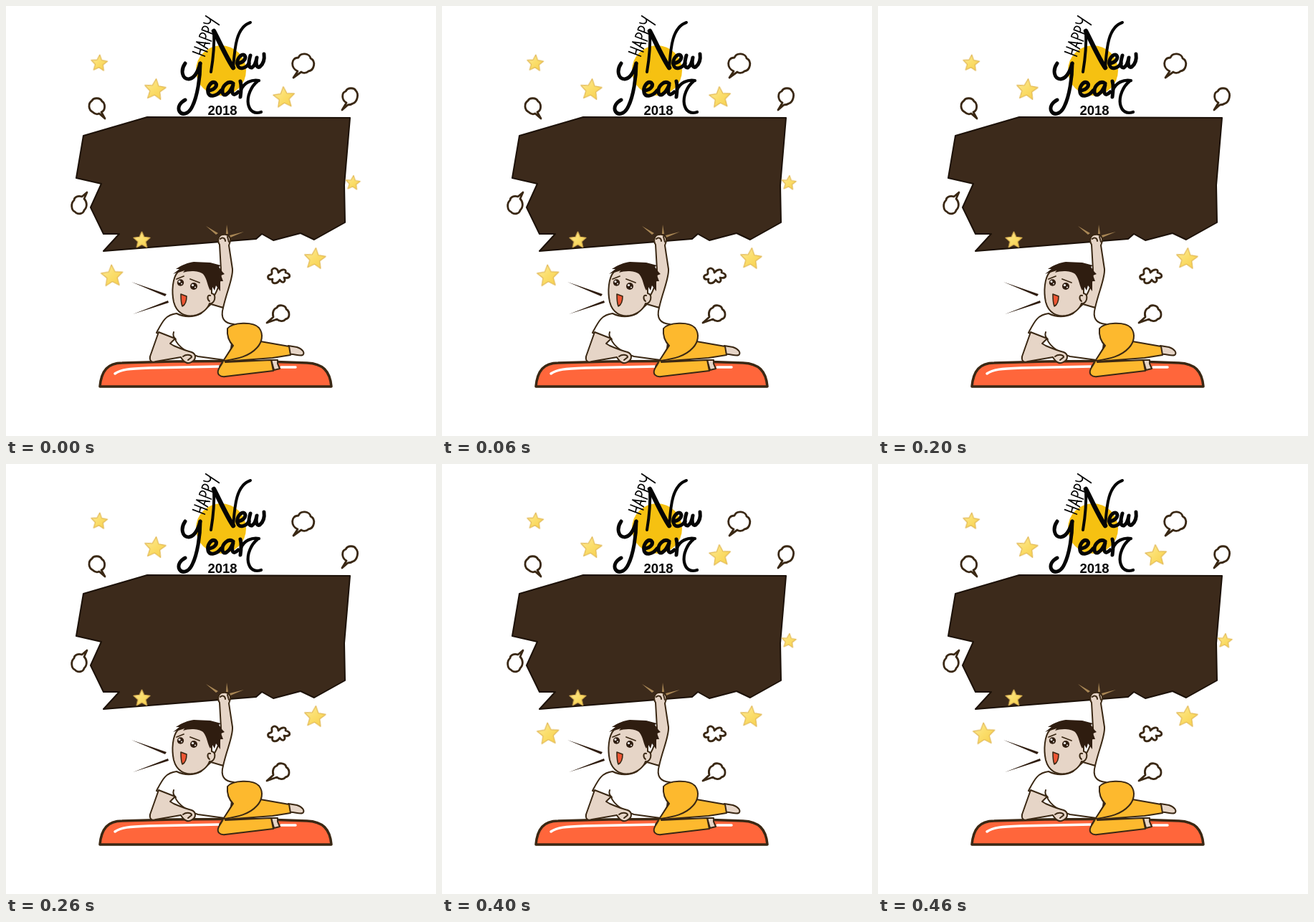
An HTML page that plays this animation: 600x600 px, repeating every 500 ms.

```html
<!DOCTYPE html>
<html lang="en">
<head>
<meta charset="utf-8">
<title>Happy New Year 2018</title>
<style>
  html, body { margin: 0; width: 100%; height: 100%; overflow: hidden; background: #fff; }
  svg { display: block; width: 100vw; height: 100vh; }
  .line { fill: none; stroke: #3a2814; stroke-width: 2; stroke-linecap: round; stroke-linejoin: round; }
  .white { fill: #fff; }
  .skin { fill: #e6d5c7; }
  .pants { fill: #fdb92e; }
  .dark { fill: #2f1d10; }
  .puff { fill: #fff; stroke-width: 2.8; }
  .board { fill: #3c2a1b; stroke: #1c1108; stroke-width: 2; stroke-linejoin: round; }
  .spark { fill: #a98755; }
  .ink { fill: none; stroke: #050505; stroke-linecap: round; stroke-linejoin: round; }
  .year { font: bold 18.5px "Liberation Sans", Arial, sans-serif; fill: #050505; text-anchor: middle; }
</style>
</head>
<body>
<svg viewBox="0 0 600 600">
  <defs>
    <linearGradient id="gold" x1="0" y1="0" x2="1" y2="1">
      <stop offset="0" stop-color="#fdeba6"/>
      <stop offset=".45" stop-color="#fbdf6e"/>
      <stop offset="1" stop-color="#f7cf4a"/>
    </linearGradient>
  </defs>
  <rect width="600" height="600" fill="#fff"/>

  <g id="lettering">
    <circle cx="300" cy="90" r="35" fill="#f6c111"/>
    <path class="ink" stroke-width="1.7" transform="translate(277 71) rotate(-69)"
      d="M1 0V-18M8 1V-18M1 -8L8 -9M12 0L15.5 -18L20 0M13 -6H19M24 1V-17C33 -19 32 -7 24 -8
         M34 1V-17C43 -19 42 -7 34 -8M44 -18C44 -10 49 -8 52 -12M54 -19L49 3"/>
    <g class="ink" stroke-width="5">
      <path stroke-width="4" d="M290 35C291 54 289 74 286 92"/>
      <path stroke-width="6.5" d="M290 35C298 50 307 71 317 86"/>
      <path stroke-width="4" d="M317 87C319 62 320 30 341 23"/>
      <path d="M324 80C331 79 336 73 333 69C328 65 321 75 323 82C325 90 335 87 339 80"/>
      <path d="M341 69C338 79 338 87 343 86C347 84 349 77 350 72C348 81 350 87 354 85C359 81 361 74 360 67"/>
      <path d="M250 80C243 90 246 102 255 102C263 101 268 91 271 80"/>
      <path d="M271 80C271 100 267 126 260 140C255 151 246 153 242 147C239 141 243 135 250 131"/>
      <path d="M283 118C291 117 296 111 292 107C286 104 280 114 282 121C284 128 294 126 300 118"/>
      <path d="M317 108C310 103 301 112 302 120C303 128 311 124 317 110C314 121 316 128 324 120"/>
      <path d="M327 105C329 112 328 120 327 127"/>
      <path stroke-width="4.2" d="M328 117C332 107 343 102 353 104"/>
      <path stroke-width="4.2" d="M351 105C342 112 336 126 338 137C340 147 347 151 356 148"/>
    </g>
    <text class="year" x="302" y="152">2018</text>
  </g>

  <g class="line puff">
    <path d="M401 100L407 91C397 87 397 72 408 72C411 64 424 66 425 73C433 77 430 90 422 91C418 95 413 93 412 92Z"/>
    <path d="M469 145L475 135C468 131 468 121 474 119C477 113 486 114 488 118C493 123 490 134 484 136C481 138 478 138 477 138Z"/>
    <path d="M138 157L133 148C139 146 139 136 134 133C131 127 122 128 120 132C114 136 115 145 121 148C125 152 128 151 130 150Z"/>
    <path d="M113 260L106 266C100 264 95 267 95 271C90 275 91 285 96 287C100 292 108 290 109 285C114 280 113 273 109 269Z"/>
    <path d="M364 442L373 434C371 427 374 422 378 421C380 416 390 417 391 423C397 427 396 436 390 437C387 441 381 440 378 437Z"/>
    <path d="M371 368C375 363 380 368 380 372C385 366 392 367 390 372C399 374 397 381 388 379C391 385 386 388 382 382C378 389 369 388 372 381C365 383 363 376 369 375C373 374 370 371 371 368Z"/>
  </g>

  <g id="boardA">
    <path class="board" d="M108 181L197 155L480 156L472 250L473 302L430 326L411 317L373 327L357 318L349 325L136 342L158 318L136 318L118 281L133 248L98 240Z"/>
    <path class="spark" d="M279 307L296 317L293 319ZM308 305L310 318L307 318ZM332 315L313 323L312 320Z"/>
  </g>
  <g id="boardB">
    <path class="board" d="M114 176L204 154L487 168L474 268V315L455 326L413 334L403 328L372 335L358 325L349 331L134 338L155 318L135 317L120 276L137 245L101 235Z"/>
    <path class="spark" d="M279 319L297 325L295 328ZM314 309L310 321L307 320ZM331 320L314 327L313 324Z"/>
  </g>

  <g id="bed">
    <path class="line" style="fill:#ff663b;stroke-width:3.5;stroke-linecap:butt"
      d="M131 531C133 509 142 498 162 498C250 495 330 494 420 498C442 499 452 509 454 531Z"/>
    <path class="line" style="stroke:#fff;stroke-width:3.5" d="M152 513C160 507 172 506 200 505L297 503M384 504H404"/>
  </g>

  <g id="man" class="line">
    <path class="skin" d="M298 333C294 327 297 319 303 319C309 318 314 322 313 328L311 334L316 367C317 380 308 398 303 421L283 417C294 400 300 388 300 368Z"/>
    <path d="M299 325C302 322 306 324 306 328M309 322L311 329"/>
    <path class="white" d="M238 429C222 431 218 441 210 456L236 465C240 476 257 486 268 489L312 495L318 444C304 443 299 435 303 421L286 416L272 429C260 435 248 434 238 429Z"/>
    <path d="M237 465C233 462 233 458 234 455"/>
    <path class="skin" d="M213 455L201 489C200 495 203 498 209 496L244 490C248 497 254 501 260 496C265 493 266 486 259 483C251 481 241 477 234 474L229 471L236 464Z"/>
    <path d="M247 489C251 486 257 486 259 489M254 494L259 490"/>

    <path class="skin" d="M394 474L406 476C413 478 418 484 414 487C409 489 402 485 395 486ZM370 494L379 494L379 499L382 506L374 508Z"/>
    <path class="pants" d="M330 443L355 468L395 475L397 487L372 491L306 496Z"/>
    <path class="pants" d="M316 475L297 506C293 514 299 518 306 517L373 509L370 494L306 497Z"/>
    <path class="pants" d="M298 503L317 474C311 468 308 460 309 450C316 441 345 440 353 449C360 458 357 470 350 477C339 489 324 492 305 495"/>

    <path class="skin" d="M240 371C232 379 231 399 234 413C238 428 249 434 262 432C273 430 281 423 284 415C291 417 295 402 287 401L287 376L268 362Z"/>
    <path d="M285 404C281 402 280 409 284 412"/>
    <path class="dark" stroke="none" d="M233 374L242 367L237 367C246 361 254 358 262 357L285 358L300 362L297 364L302 371L305 374L300 376L303 384L299 384L299 398L293 390L291 397L288 392L285 397C281 391 281 381 275 374C269 369 255 369 247 372L250 368Z"/>
    <path d="M238 381L248 377M257 381L270 386" stroke-width="1.8"/>
    <g stroke="none">
      <circle class="dark" cx="243.5" cy="386" r="4.7"/>
      <circle class="dark" cx="262" cy="391" r="5"/>
      <g class="white">
        <circle cx="242" cy="384.5" r="1.5"/><circle cx="245" cy="387.5" r=".9"/>
        <circle cx="260.5" cy="389.5" r="1.6"/><circle cx="264" cy="392.5" r="1"/>
      </g>
    </g>
    <path style="fill:#ee5634" stroke-width="1.6" d="M244 402L252 405C252 411 250 417 246 419C244 414 244 408 244 402Z"/>
    <path class="dark" stroke="none" d="M175 385L224 402L222 405ZM177 430L226 411L227 414Z"/>
  </g>

  <g id="stars"></g>
</svg>
<script>
  const STEP = 100, STEPS = 5;
  const NS = 'http://www.w3.org/2000/svg';
  const $ = id => document.getElementById(id);

  // One character per step: 1 is shown, 0 is hidden.
  function blink(el, pattern) {
    const keys = [...pattern].map((c, i) => ({ opacity: +c, offset: i / STEPS, easing: 'step-end' }));
    keys.push({ opacity: +pattern[0], offset: 1 });
    el.animate(keys, { duration: STEP * STEPS, iterations: Infinity }).startTime = 0;
  }

  function add(parent, tag, attrs) {
    const el = parent.appendChild(document.createElementNS(NS, tag));
    for (const key in attrs) el.setAttribute(key, attrs[key]);
    return el;
  }

  function star(x, y, r, turn, pattern) {
    const g = add($('stars'), 'g', { transform: `translate(${x} ${y}) rotate(${turn}) scale(${r})` });
    const points = Array.from({ length: 10 }, (_, i) => {
      const a = (i * 36 - 90) * Math.PI / 180, d = i % 2 ? 0.47 : 1;
      return [Math.cos(a) * d, Math.sin(a) * d].map(v => v.toFixed(3)).join();
    }).join(' ');
    add(g, 'polygon', {
      points, fill: 'url(#gold)', stroke: '#e2b955',
      'stroke-width': 1.2 / r, 'stroke-linejoin': 'round'
    });
    blink(g, pattern);
  }

  const early = '11101', late = '11011';
  [
    [130, 80, 12, 4, early],
    [208, 117, 15.5, 6, early],
    [388, 128, 15.5, -4, late],
    [484, 247, 10.5, 5, late],
    [189.5, 327, 12, 0, early],
    [431, 353, 15.5, 5, early],
    [148, 377, 16, -3, late]
  ].forEach(s => star(...s));

  blink($('boardA'), '10101');
  blink($('boardB'), '01010');
</script>
</body>
</html>
```
